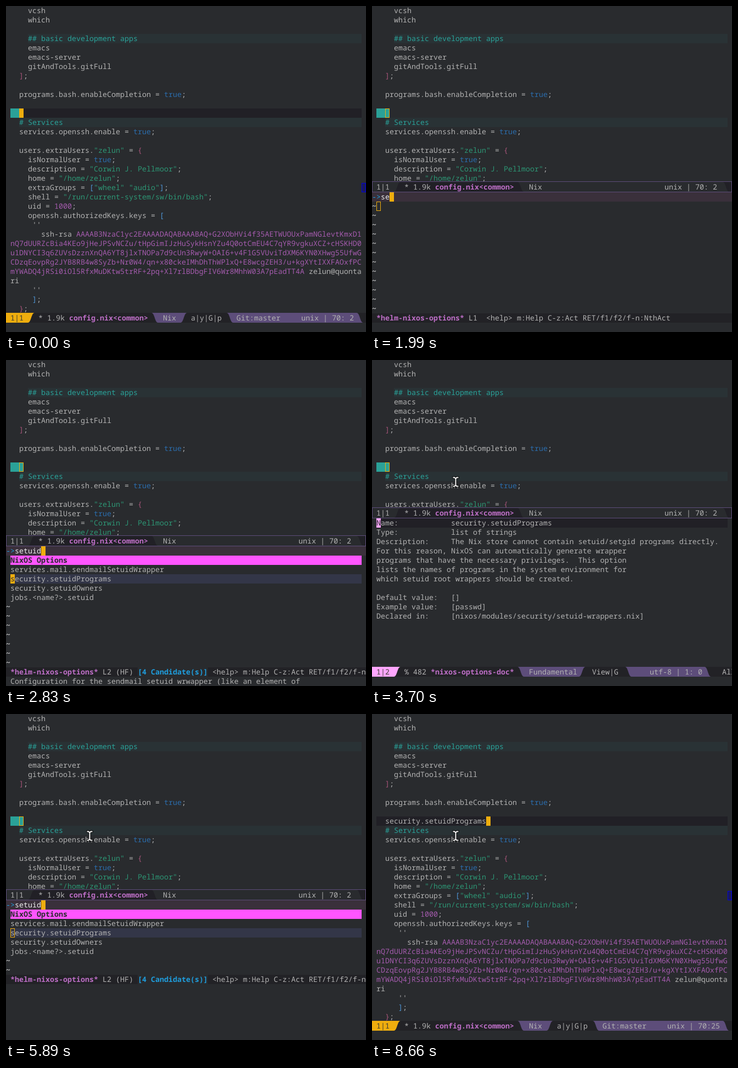
An HTML page for the animation above (9.84 s loop, 656 by 595 pixels).

```html
<!DOCTYPE html>
<html lang="en">
<head>
<meta charset="utf-8">
<title>Browsing NixOS options in Emacs</title>
<style>
  html, body { margin: 0; width: 100%; height: 100%; overflow: hidden; background: #292b2e; }
  svg { display: block; }
  text {
    font: 13.333px "Noto Sans Mono", "DejaVu Sans Mono", monospace;
    white-space: pre;
    text-rendering: geometricPrecision;
  }
</style>
</head>
<body>
<svg id="stage" width="656" height="595" viewBox="0 0 656 595"></svg>
<script>
const LOOP = 9840, W = 656, CELL = 8, ROW = 17, BAR = 18;
const C = {
  bg: '#292b2e', dark: '#212026', bar: '#222226', purple: '#5d4d7a', text: '#b2b2b2',
  comment: '#2aa198', commentBg: '#293235', string: '#2d9574', key: '#a45bad',
  bool: '#2b6cab', brace: '#a8557a', bracket: '#4f97d7', orange: '#eead0e',
  name: '#bc6ec5', blue: '#1f9ede', pink: '#ff55ff', lightPink: '#ffa6ff',
  header: '#3a303b', select: '#333648', white: '#eeeeee'
};

// drawing helpers
const esc = s => s.replace(/&/g, '&amp;').replace(/</g, '&lt;');
const rect = (x, y, w, h, fill) => `<rect x="${x}" y="${y}" width="${w}" height="${h}" fill="${fill}"/>`;
const outline = (x, y, w, h, color, fill = 'none') =>
  `<rect x="${x + .5}" y="${y + .5}" width="${w - 1}" height="${h - 1}" fill="${fill}" stroke="${color}"/>`;

// each part is a plain string or [string, colour, bold]
function text(x, top, ...parts) {
  const spans = parts.map(p => {
    const [s, color = C.text, bold] = [].concat(p);
    return `<tspan fill="${color}"${bold ? ' font-weight="700"' : ''}>${esc(s)}</tspan>`;
  });
  return `<text x="${x}" y="${top + 13}" xml:space="preserve">${spans.join('')}</text>`;
}
const line = (col, row, ...parts) => text(8 + col * CELL, row * ROW, ...parts);
const block = (x, top, color, char = '') => rect(x, top, CELL, ROW, color) + text(x, top, [char, C.bg]);
const hollow = (x, top) => outline(x, top, CELL, ROW, C.orange);
const str = s => [s, C.string], bool = s => [s, C.bool], key = s => [s, C.key];
const brace = s => [s, C.brace], bracket = s => [s, C.bracket];

// invented key text: the usual RSA header followed by seeded characters
const ALPHABET = 'ABCDEFGHIJKLMNOPQRSTUVWXYZabcdefghijklmnopqrstuvwxyz0123456789+/';
let seed = 70;
function keyText(n) {
  let out = '';
  while (out.length < n) {
    seed = (seed * 1103515245 + 12345) % 2147483648;
    out += ALPHABET[Math.floor(seed / 2147483648 * 64)];
  }
  return out;
}

const comment = (col, row, s) =>
  rect(8 + col * CELL, row * ROW, 640 - col * CELL, ROW, C.commentBg) + line(col, row, [s, C.comment]);

const code = [
  line(4, 0, 'vcsh'),
  line(4, 1, 'which'),
  comment(4, 3, '## basic development apps'),
  line(4, 4, 'emacs'),
  line(4, 5, 'emacs-server'),
  line(4, 6, 'gitAndTools.gitFull'),
  line(2, 7, brace(']'), ';'),
  line(2, 9, 'programs.bash.enableCompletion = ', bool('true'), ';'),
  comment(2, 12, '# Services'),
  line(2, 13, 'services.openssh.enable = ', bool('true'), ';'),
  line(2, 15, 'users.extraUsers.', str('"zelun"'), ' = ', brace('{')),
  line(4, 16, 'isNormalUser = ', bool('true'), ';'),
  line(4, 17, 'description = ', str('"Corwin J. Pellmoor"'), ';'),
  line(4, 18, 'home = ', str('"/home/zelun"'), ';'),
  line(4, 19, 'extraGroups = ', bracket('['), str('"wheel" "audio"'), bracket(']'), ';'),
  line(4, 20, 'shell = ', str('"/run/current-system/sw/bin/bash"'), ';'),
  line(4, 21, 'uid = ', key('1000'), ';'),
  line(4, 22, 'openssh.authorizedKeys.keys = ', bracket('[')),
  line(5, 23, "''"),
  line(7, 24, 'ssh-rsa ', key('AAAAB3NzaC1yc2EAAAADAQABAAABAQ' + keyText(35))),
  ...[25, 26, 27].map(row => line(0, row, key(keyText(80)))),
  line(0, 28, key(keyText(67)), ' zelun@quonta'),
  line(0, 29, 'ri'),
  line(5, 30, "''"),
  line(5, 31, bracket(']'), ';'),
  line(2, 32, brace('}'), ';')
].join('');

// mode line: edges are [x, lean, colour to the right]
function modeLine(top, first, edges, labels) {
  const bottom = top + BAR;
  const shapes = edges.map(([x, lean, color]) => {
    const d = lean === '/' ? 6 : -6;
    return `<path fill="${color}" d="M${x + d},${top}C${x},${top} ${x},${bottom} ${x - d},${bottom}H${W}V${top}Z"/>`;
  });
  return rect(0, top, W, BAR, first) + shapes.join('') +
    labels.map(([x, ...parts]) => text(x, top + 1, ...parts)).join('');
}
const fileLabel = [59, '* 1.9k ', ['config.nix<common>', C.name, true]];

const activeBar = pos => modeLine(560, C.orange,
  [[46, '/', C.bar], [271, '\\', C.purple], [324, '/', C.bar], [408, '\\', C.purple], [645, '\\', C.bar]],
  [[8, ['1|1', '#3e3d31']], fileLabel, [286, 'Nix'], [337, 'a|y|G|p'], [420, 'Git:master'], [538, 'unix | ' + pos]]);

const inactiveBar = top => modeLine(top + 1, C.bg,
  [[46, '/', C.dark], [271, '\\', C.bg], [645, '\\', C.dark]],
  [[8, '1|1'], fileLabel, [286, 'Nix'], [533, 'unix | 70: 2']]) +
  outline(0, top, W, BAR + 2, C.purple);

const docBar = modeLine(560, C.lightPink,
  [[46, '/', C.bar], [271, '\\', C.purple], [383, '/', C.bar], [467, '\\', C.purple], [612, '\\', C.bar]],
  [[8, ['1|2', '#3e3d31']], [59, '% 482 ', ['*nixos-options-doc*', C.name, true]],
   [286, 'Fundamental'], [401, 'View|G'], [506, 'utf-8 | 1: 0'], [638, 'All']]);

const echo = s => text(8, 578, s);
const beam = 'M148.5,214.5H150.5L152.5,216.5L154.5,214.5H156.5M152.5,216.5V228.5M148.5,230.5H150.5L152.5,228.5L154.5,230.5H156.5';
const pointer = [['#000', 4], ['#fff', 2]].map(([color, width]) =>
  `<path d="${beam}" fill="none" stroke="${color}" stroke-width="${width}" stroke-linecap="square"/>`).join('');

// the whole editor on the config file
function editor(inserted = '') {
  return rect(8, 187, 640, ROW, C.dark) +
    (inserted ? line(2, 11, inserted) : rect(8, 187, 16, ROW, C.comment)) +
    block(24 + inserted.length * CELL, 187, C.orange) + code +
    outline(648, 323, CELL, ROW, '#0000e0', '#1a1a5c') +
    rect(0, 560, W, 35, C.bg) + activeBar(inserted ? '70:25' : '70: 2');
}

// the config file above a second window starting at top
function split(top, solid) {
  const bar = top - BAR - 2;
  return rect(8, 187, 24, ROW, C.comment) +
    (solid ? block(24, 187, C.orange) : hollow(24, 187)) +
    code + rect(0, bar, W, 595 - bar, C.bg) + inactiveBar(bar);
}

const WRAPPER = 'services.mail.sendmailSetuidWrapper';
const SETUID = ['security.setuidPrograms', 'security.setuidOwners', 'jobs.<name?>.setuid'];
const FOUR = [WRAPPER, ...SETUID];
const EIGHT = ['services.xserver.displayManager.kdm.setupScript', 'services.strongswan.setup', WRAPPER,
  'services.gvpe.customIFSetup', 'services.aiccu.setupScript', ...SETUID];
const ACTIONS = ['[f1]  View documentation', '[f2]  Insert into buffer', '[f3]  Pretty print'];
const KDM = 'The path to a KDM setup script. This script is run as root just';
const MAIL = 'Configuration for the sendmail setuid wrwapper (like an element of';
const STORE = 'The Nix store cannot contain setuid/setgid programs directly.';

function helm({ typed = '', items = [], pick = 1, note = '', rows = 12, solid = false,
                title = 'NixOS Options', buffer = '*helm-nixos-options*', flag = ' (HF)' }) {
  const y = i => 357 + i * ROW;
  const filled = items.length > 0;
  const cursorTop = y(filled ? pick : 0);
  let out = split(340) + rect(0, 340, W, ROW, C.header) +
    text(0, 340, ['->', C.blue], [typed, C.white]) + block(16 + typed.length * CELL, 340, C.orange);
  if (filled) {
    out += rect(8, y(0), 640, ROW, C.pink) + text(8, y(0), [title, C.bg, true]) +
      rect(8, y(pick), 640, ROW, C.select) + items.map((s, i) => text(8, y(i + 1), s)).join('');
  }
  for (let i = filled ? items.length + 1 : 0; i < rows; i++) out += text(0, y(i), ['~', C.white]);
  out += solid ? block(8, cursorTop, C.orange, items[pick - 1][0]) : hollow(8, cursorTop);

  out += rect(0, y(rows), W, ROW, C.bar);
  let status = [' L1  '];
  if (filled) {
    const place = ` L${pick}${flag} `, count = `[${items.length} Candidate(s)]`;
    status = [place, [count, C.blue, true], ' '];
    out += rect(8 + (buffer + place).length * CELL, y(rows), count.length * CELL, ROW, C.bg);
  }
  return out + echo(note) +
    text(8, y(rows), [buffer, C.name, true], ...status, '<help> m:Help C-z:Act RET/f1/f2/f-n:NthAct');
}

const DOC = [
  'Name:            security.setuidPrograms',
  'Type:            list of strings',
  'Description:     ' + STORE,
  'For this reason, NixOS can automatically generate wrapper',
  'programs that have the necessary privileges.  This option',
  'lists the names of programs in the system environment for',
  'which setuid root wrappers should be created.',
  '',
  'Default value:   []',
  'Example value:   [passwd]',
  'Declared in:     [nixos/modules/security/setuid-wrappers.nix]'
];
const doc = solid => split(289, solid) + rect(8, 289, 640, ROW, C.dark) +
  DOC.map((s, i) => text(8, 289 + i * ROW, s)).join('') +
  block(8, 289, C.lightPink, 'N') + docBar + pointer;

const resumed = { typed: 'setuid', items: FOUR, pick: 2 };
const home = editor(), back = home + pointer;

const steps = [
  [0, home],
  [720, home + echo('SPC-')],
  [950, home + echo('SPC h-')],
  [1160, home + echo('SPC h .')],
  [1360, helm({})],
  [1870, helm({ typed: 's' })],
  [1950, helm({ typed: 'se' })],
  [2030, helm({ typed: 'set' })],
  [2120, helm({ typed: 'setu' })],
  [2160, helm({ typed: 'setu', items: EIGHT, note: KDM })],
  [2240, helm({ typed: 'setui', items: EIGHT, note: KDM })],
  [2320, helm({ typed: 'setuid', items: EIGHT, note: KDM })],
  [2360, helm({ typed: 'setuid', items: FOUR, note: KDM, solid: true })],
  [2400, helm({ typed: 'setuid', items: FOUR, note: MAIL })],
  [2830, helm({ ...resumed, note: MAIL, solid: true })],
  [2870, helm({ ...resumed, note: STORE })],
  [3660, back],
  [3700, doc(false)],
  [5170, doc(true)],
  [5210, back],
  [5520, back + echo('SPC-')],
  [5650, back + echo('SPC h-')],
  [5810, back + echo('SPC h l')],
  [5850, helm(resumed) + pointer],
  [5890, helm({ ...resumed, rows: 7 }) + pointer],
  [7380, helm({ items: ACTIONS, title: 'Actions', buffer: '*helm action*', flag: '', rows: 7 }) + pointer],
  [8660, editor('security.setuidPrograms') + pointer]
];

const stage = document.getElementById('stage');
const start = performance.now();
let shown = -1;
function draw() {
  const t = (performance.now() - start) % LOOP;
  const now = steps.findLastIndex(([at]) => at <= t);
  if (now !== shown) {
    shown = now;
    stage.innerHTML = steps[now][1];
  }
  requestAnimationFrame(draw);
}
draw();
</script>
</body>
</html>
```
